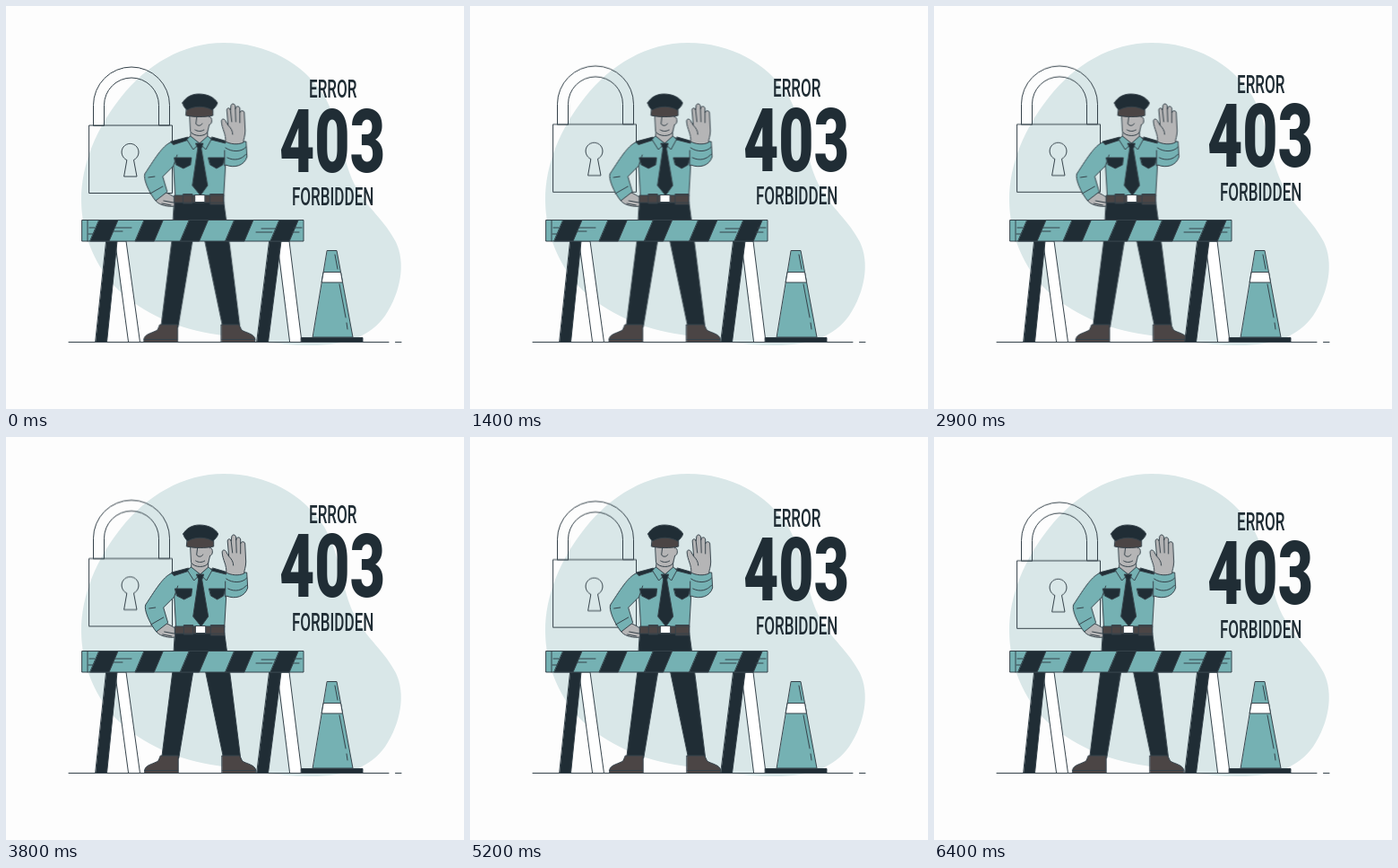
Animation, 511 px wide and 449 px high, one loop 6.5 s. Source, as an HTML page:

```html
<!DOCTYPE html>
<html lang="en">
<head>
<meta charset="utf-8">
<title>Error 403</title>
<style>
  :root { --ink: #202d35; --teal: #75b1b3; --skin: #b5b5b6; --leather: #4b4545; --paper: #fdfdfd; }
  html, body { margin: 0; width: 100%; height: 100%; overflow: hidden; background: var(--paper); }
  svg { display: block; width: 100%; height: 100%; }

  .line { stroke: #35424a; stroke-width: 1; stroke-linejoin: round; stroke-linecap: round; }
  .none { fill: none; }
  .ink { fill: var(--ink); }
  .teal { fill: var(--teal); }
  .skin { fill: var(--skin); }
  .leather { fill: var(--leather); }
  .paper { fill: #fff; }

  text { font-family: Roboto, "Liberation Sans", sans-serif; font-weight: 500; font-size: 28px;
         text-anchor: middle; fill: var(--ink); }
  .code { font-weight: 900; font-size: 99px; }

  .lock, .man, .message { animation: float 6s linear infinite paused;
                          animation-delay: calc(-5500ms - var(--t, 0) * 1ms); }
  .lock { animation-duration: 1.5s; }
  .man { animation-name: shake; }

  @keyframes float { 50% { transform: translateY(-9px); } }
  @keyframes shake {
    10%, 90% { transform: translateX(-.9px); }
    20%, 80% { transform: translateX(1.8px); }
    30%, 50%, 70% { transform: translateX(-3.6px); }
    40%, 60% { transform: translateX(3.6px); }
  }
</style>
</head>
<body>
<svg id="scene" viewBox="0 0 511 449">
  <path fill="#d9e7e8" d="M243 41C291 41 332 64 355 100C376 137 374 175 392 204C404 226 422 238 435 263C446 286 441 318 423 345C406 369 378 378 340 378C300 378 264 370 235 366C193 360 153 343 125 316C100 291 84 254 84 216C84 176 101 136 128 102C157 65 198 41 243 41Z"/>
  <path class="line" d="M70 374.5H427M434.5 374.5H441"/>

  <g class="lock line none">
    <path d="M97.5 139V116.5A42.5 42.5 0 0 1 182.5 116.5V139H170.5V116.5A30.5 30.5 0 0 0 109.5 116.5V139Z"/>
    <path d="M93 139H185.5V214.5H93Z"/>
    <path d="M134.5 177.5A9.5 9.5 0 1 1 142.5 177.5L146 196H132Z"/>
  </g>

  <g class="man">
    <g transform="translate(.7 0)" class="line">
      <path class="ink" d="M188 218H243L250 270L261 358H242L222 262L217 240H213L208 262L192 358H173L185 263Z"/>

      <path class="leather" d="M172 355H191.5V374.5H154V371C155 365 165 364 169 361Z"/>
      <path class="leather" d="M240.5 355H260L263 361C267 364 277 365 278 371V374.5H240.5Z"/>
      <path class="none" d="M154 371.5H191M241 371.5H278"/>

      <path class="skin" d="M168 208C175 204 183 210 188 213V223C181 224 172 222 168 218C166 214 166 211 168 208Z"/>
      <path class="none" d="M176 217L187 219M174 220L184 222"/>
      <path class="teal" d="M204 147L186 151C176 154 168 167 155 187C153 192 159 207 167 217L180 207L175 190L187 178L189 212H243L245 177C255 181 266 178 269 168L268 151H245L228 147Z"/>
      <path class="none" d="M187 178L191 166M159 191L166 190M161 209L175 201M244 178V161M245 158C252 163 263 163 268 157M247 169C255 173 263 171 268 165"/>
      <path class="ink" d="M184 151L203 146L204 149L187 154.5ZM230 146L244 150L245 153L229 149Z"/>
      <path class="skin" d="M207 138H225V147L216 153L206 147Z"/>
      <path class="teal" d="M206 145L216 153L209 160L202 149ZM225 145L216 153L223 160L229 149Z"/>
      <path class="ink" d="M212 153H220L218 159L225 200L217 211L208 200L214 159Z"/>
      <path class="ink" d="M188 169H207L206 177L198 181L190 177ZM226 169H244L242 177L235 181L228 177Z"/>
      <path class="leather" d="M188 211H243V219H188ZM198 209.5H208V220H198ZM228 209.5H243V221H228Z"/>
      <path class="paper" d="M211 210.5H222V218.5H211Z"/>

      <path class="skin" d="M245 151C246 143 241 137 240.5 129C240 125 244.5 125 245.5 129L248 133L246.500 116C246.5 113 250 113 250.5 116L251 112C251 108 255.5 108 256 112V115C256 111 260.5 111 261 114V119C261 116 266 116 266 119L267 139C267 145 265 148 265 152C259 155 250 154 245 151Z"/>
      <path class="none" d="M250.5 116L252 129M256 114L256.500 129M261 119V130M248 133C251 136 253 139 253 143"/>

      <path class="skin" d="M205 116H227V124C230 122 231 132 227 132L225 140C223 146 209 146 206 140Z"/>
      <path class="none" d="M213 123L212 131C213 134 218 134 219 131M211 138C214 140 218 140 221 138"/>
      <path class="leather" d="M202 111H231L231 122C222 124 210 124 201 122Z"/>
      <path class="ink" d="M197 108C200 102 207 98 215 98C225 98 233 102 236 108C235 112 232 114 230 116C222 111 210 111 202 116C200 114 198 112 197 108Z"/>
    </g>
  </g>

  <g class="line">
    <path class="paper" d="M122 262H134L149.5 374.5H137ZM303 262H316L330 374.5H317Z"/>
    <path class="ink" d="M112 262H124L112.5 374.5H100ZM294 262H307L292.5 374.5H280Z"/>
    <path class="teal" d="M85 238.5H332V262H85Z"/>
    <g id="stripes"></g>
    <path class="none" d="M91 238.5V262M93 247H99M121 247H140M119 251H130M92 254H97M285 248H301M279 252H297M321 247H330M319 252H327"/>
  </g>

  <g class="line">
    <path class="teal" d="M358.5 272.5H369L387 369H342.5Z"/>
    <path class="paper" d="M354.5 296.5H373.5L375.5 308H352.5Z"/>
    <path class="none" d="M367 277L370 293M372 310L379 347M380 353L381 360"/>
    <path class="ink" d="M329.5 369.5H398V374.5H329.5Z"/>
  </g>

  <g class="message">
    <g transform="translate(364.7 0) scale(.61 1)">
      <text y="104">ERROR</text>
      <text y="224">FORBIDDEN</text>
    </g>
    <text class="code" transform="translate(364 186.2) scale(.685 1)">403</text>
  </g>
</svg>
<script>
  const LOOP = 6500, STEP = 100;
  const scene = document.getElementById("scene");

  document.getElementById("stripes").innerHTML = Array.from({ length: 5 }, (_, i) =>
    `<path class="ink" d="M${104 + i * 50.3} 238.5h21l-10 23.5h-21Z"/>`).join("");

  function draw() {
    const t = performance.now() % LOOP;
    scene.style.setProperty("--t", Math.floor(t / STEP) * STEP);
    requestAnimationFrame(draw);
  }
  draw();
</script>
</body>
</html>
```
